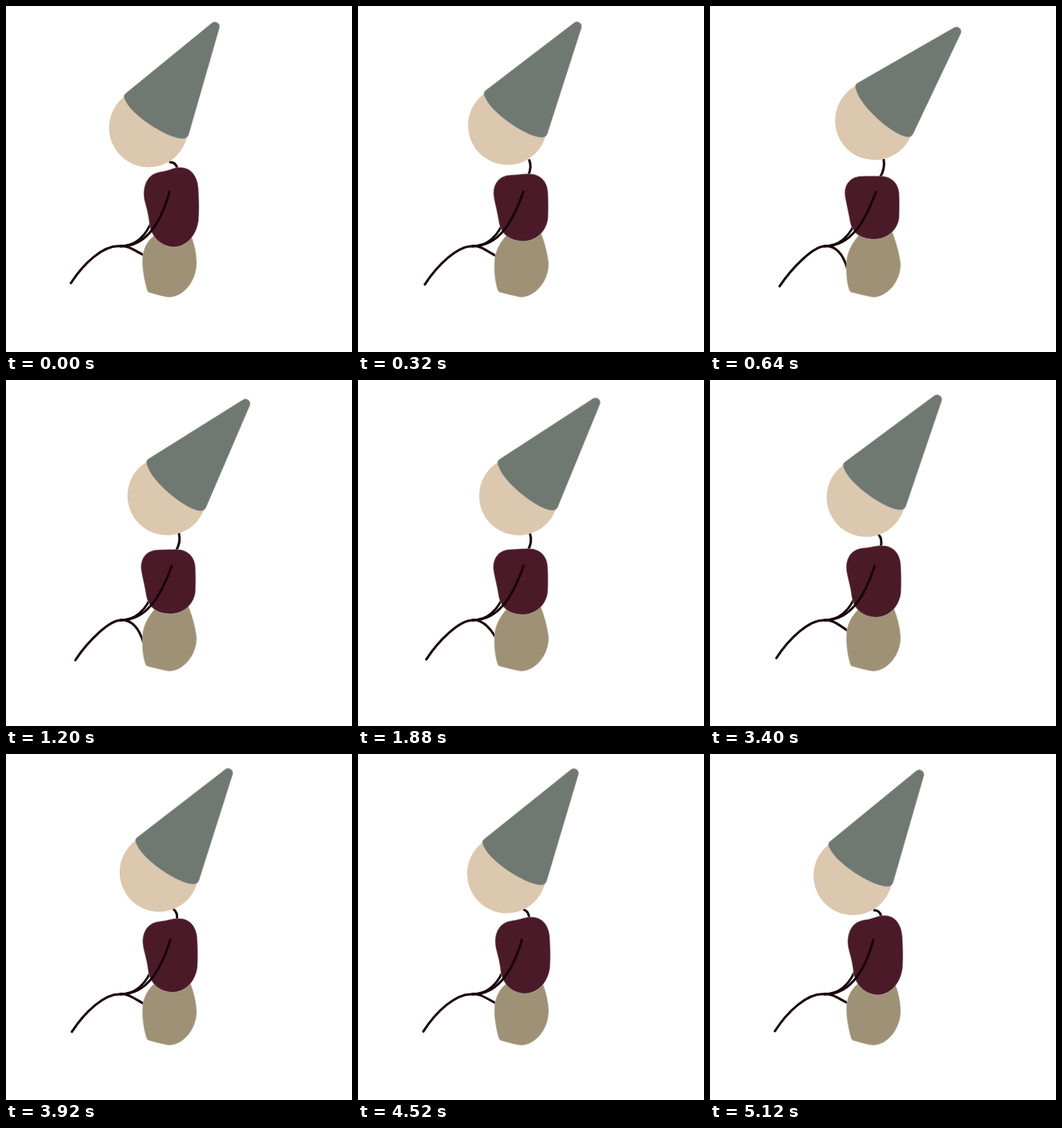
These frames come from a looping animation (432x432 px, 5160 ms). An HTML page:

```html
<!DOCTYPE html>
<html lang="en">
<meta charset="utf-8">
<title>Nodding gnome</title>
<style>
  html, body { margin: 0; width: 100%; height: 100%; overflow: hidden; background: #fff }
  svg { display: block; width: 100vw; height: 100vh }
  .line { fill: none; stroke: #1a0508; stroke-width: 3; stroke-linecap: round; stroke-linejoin: round }
  .shape { stroke: #c8c4be99; stroke-width: .8 }
</style>
<svg viewBox="0 0 432 432">
  <path id="limbs" class="line"/>
  <path id="belly" class="shape" fill="#9f9175"/>
  <path id="neck" class="line"/>
  <path id="body" class="shape" fill="#4a1a29"/>
  <path id="arm" class="line"/>
  <g id="head">
    <circle r="49.3" fill="#dcc8ae"/>
    <path class="shape" fill="#707872" d="M-47.5-20L-5.2-153A6 6 0 0 1 6-153L46.8-20Q48-14 42-11C25-1.5-25-1.5-42-12Q-49-15-47.5-20Z"/>
  </g>
</svg>
<script>
const LOOP = 5160, STEP = 40, PEAK = 560, SETTLE = 1160;

// Outlines at rest and when fully squashed.
const body = [
  'M172,235C172,220 179,209 193,207C206,205 208,201.5 217,201.5C231,201 239,213 240,226C241,238 241.5,255 240.5,267C238,288 224,301 209,301C193,300 181,288 179,272C177,252 172,245 172,235Z',
  'M168.5,235C168,221 177,212 190,212C203,211.5 203,211.5 214,211.5C228,212 236,222 236.5,234C237,246 237,254 236.5,265C234,282 220,292 205,292C189,291.5 178,285 175,269C173,256 169.5,244 168.5,235Z'
];
const belly = [
  'M180,358Q177,358 176,354C172,340 169,322 171,310C174,294 184,284 200,280L225,278C232,284 238,305 238,320C238,345 220,364 203,363.5Q197,363 180,358Z',
  'M177,357.5Q174.5,357 173.5,353C170,342 169.5,325 171,314C174,298 186,284 200,272L222,272C227,276 237,307 238,322C238,345 220,364 203,363.5Q197,362.5 177,357.5Z'
];

const mix = (a, b, k) => a + (b - a) * k;

function morph([from, to], k) {
  const ends = to.match(/[\d.]+/g);
  let i = 0;
  return from.replace(/[\d.]+/g, n => mix(+n, +ends[i++], k).toFixed(2));
}

// Rises from 0 past 1 to `peak`, settles at 1, then slowly sinks back to 0.
function swing(t, peak, rise, fall, ease = 1) {
  if (t < PEAK) return peak * (t / PEAK) ** rise;
  if (t < SETTLE) return 1 + (peak - 1) * (1 - (t - PEAK) / (SETTLE - PEAK)) ** 2;
  return (1 - ((t - SETTLE) / (LOOP - SETTLE)) ** fall) ** ease;
}

const part = id => document.getElementById(id);
const draw = (id, d) => part(id).setAttribute('d', d);

function render(t) {
  const move = swing(t, 1.26, 2.15, 2.3);
  const tilt = swing(t, 1.4, 3.1, 1.5, 1.8);
  const squash = swing(t, 1.1, .55, 1.3);
  const leg = swing(t, 1, 5, 1, 2.6);
  const hand = (squash + leg) / 2;
  const at = (k, a, b) => `${mix(a[0], b[0], k)},${mix(a[1], b[1], k)} `;

  part('head').setAttribute('transform',
    `translate(${at(move, [178, 152], [201, 144.5])}) rotate(${mix(33.1, 40.3, tilt)})`);
  draw('body', morph(body, squash));
  draw('belly', morph(belly, squash));
  draw('neck', 'M' + at(squash, [205, 195], [216, 192])
    + 'Q' + at(squash, [212, 195], [218.5, 202]) + at(squash, [214, 203], [212.5, 213]));
  draw('limbs', 'M143,300C163,299.5 176,285 183,266M143,299.5C' + at(leg, [152, 299], [157, 299])
    + at(leg, [160, 305], [166, 309]) + at(leg, [172, 311], [171.5, 328]));
  draw('arm', 'M' + at(squash, [204, 232], [207, 232]) + 'C195,265 178,300 143,300C'
    + at(hand, [122, 298], [129, 300]) + at(hand, [97, 321], [102.5, 326])
    + at(hand, [81, 346], [86.7, 349.8]));
}

function tick() {
  const t = performance.now() % LOOP;
  render(Math.floor(t / STEP) * STEP);
  requestAnimationFrame(tick);
}
tick();
</script>
</html>
```
